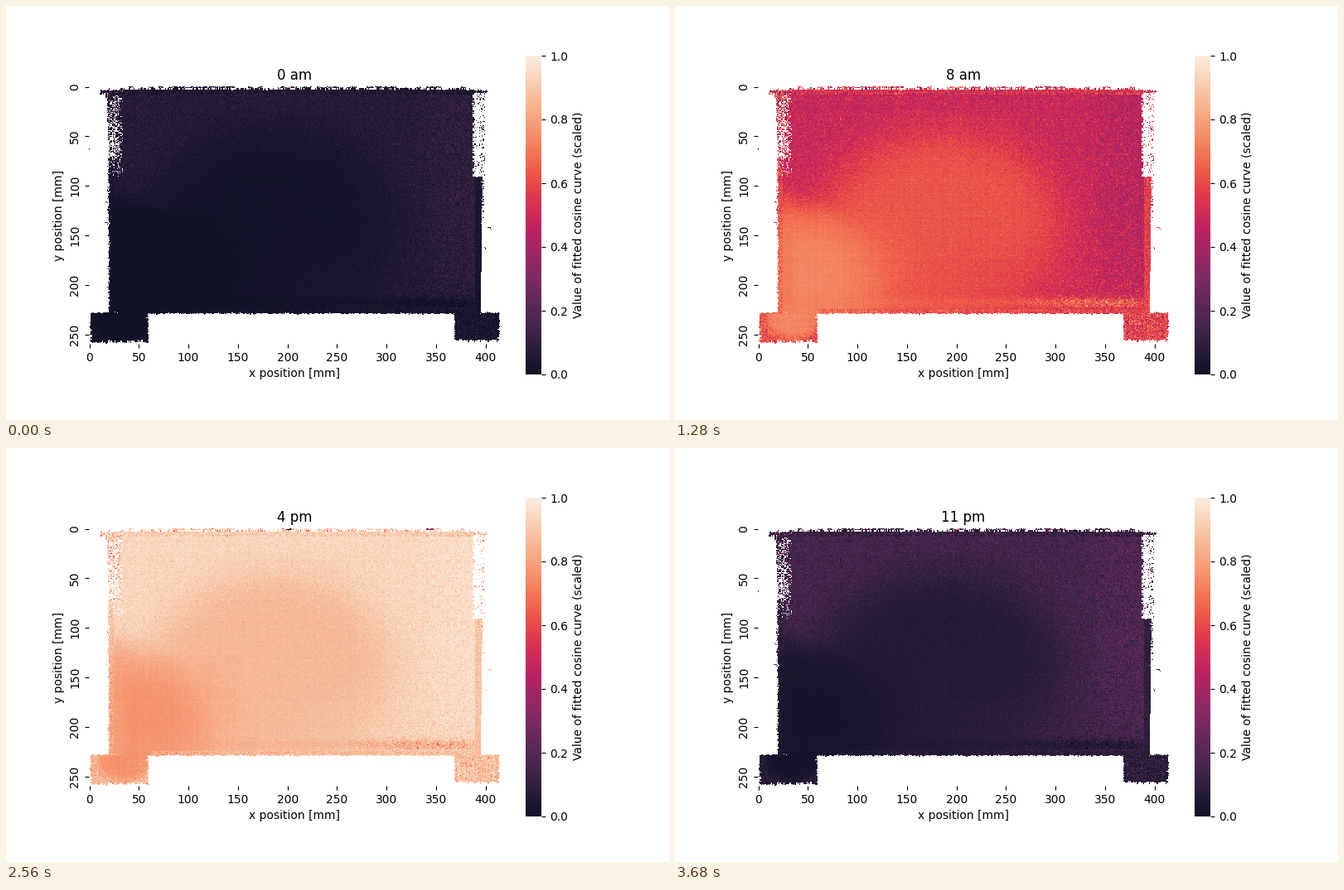
A matplotlib script for the animation above (3840 ms loop, 800 px wide and 500 px high).

```python
import numpy as np
import matplotlib.pyplot as plt
from matplotlib.animation import FuncAnimation
from matplotlib.colors import LinearSegmentedColormap, to_rgb

COLS, ROWS, HOURS = 415, 260, 24
rng = np.random.default_rng(7)
x, y = np.meshgrid(np.arange(COLS), np.arange(ROWS))

# two evenly spaced samplings of the same colour scale
SCALE_7 = "03051a 35193e 701f57 ad1759 e13342 f37651 f6b48f faebdd"
SCALE_11 = ("03051a 221331 451c47 691f55 921c5b b91657 "
            "d92847 ed503e f47d57 f6a47c f7c9aa faebdd")
ALPHA = 0.95


def on_white(color):
    return tuple(1 - ALPHA * (1 - c) for c in to_rgb("#" + color))


def make_cmap():
    stops = {}
    for scale in (SCALE_7.split(), SCALE_11.split()):
        for pos, color in zip(np.linspace(0, 1, len(scale)), scale):
            stops[float(pos)] = on_white(color)
    cmap = LinearSegmentedColormap.from_list("heat", sorted(stops.items()))
    cmap.set_bad("white")
    return cmap


def step(v):
    return 1 / (1 + np.exp(-np.clip(v, -40, 40)))


def blob(cx, cy, rx, ry, soft):
    """Soft-edged ellipse: 1 inside, 0 outside."""
    return step((1 - np.hypot((x - cx) / rx, (y - cy) / ry)) / soft)


def mix(a, b, w):
    return a * (1 - w) + b * w


def box(x0, x1, y0, y1, rough=0.6):
    """Rectangle with ragged edges."""
    jx = rng.normal(0, rough, (2, ROWS, 1))
    jy = rng.normal(0, rough, (2, 1, COLS))
    return ((x >= x0 + jx[0]) & (x < x1 + jx[1]) &
            (y >= y0 + jy[0]) & (y < y1 + jy[1]))


def sprinkle(area, density):
    return area & (rng.random((ROWS, COLS)) < density)


def make_mask():
    core = box(31, 387, 2, 229, 0.5)
    core |= box(19.5, 40, 73, 229) | box(380, 396, 91, 229)
    core &= ~((x > 394.5 - (y - 228) * 0.012) & (y > 120))
    core &= ~sprinkle((x < 34) & (y < 92), 0.15)
    feet = box(1.5, 59, 228, 257.5) | box(367.8, 413, 228, 256)
    ears = box(11, 20, 3.5, 7) | box(18, 33, 3, 9) | box(386, 402, 3.5, 6.5)

    slant = 16.5 + np.clip(y - 5, 0, 70) * 0.05
    fringe = (x >= slant) & (x < 32) & (y >= 5) & (y < 75)
    loose = sprinkle(fringe, 0.8 - 0.35 * y / 75)
    loose |= sprinkle((x >= 18) & (x < 22) & (y > 72) & (y < 140), 0.12)
    loose |= sprinkle((x >= 387) & (x < 399) & (y > 5) & (y < 92),
                      np.where(x > 392, 0.2, 0.09))
    loose |= sprinkle((x >= 395) & (x < 398) & (y > 90) & (y < 135), 0.3)

    # broken line of readings along the top edge
    runs = np.repeat(rng.random(COLS // 5) < 0.45, 5)
    runs[[*range(88, 147), *range(193, 205), *range(230, 256)]] = True
    top = (y < 2) & (x > 35) & (x < 380) & runs[None, :]
    loose |= sprinkle(top, np.where(y == 0, 0.5, 0.85))

    for px, py in [(0, 63), (402, 142), (403, 142), (404, 142), (404, 143),
                   (405, 144), (398, 162), (399, 163), (399, 164),
                   (17, 116), (16, 137), (17, 137)]:
        loose[py, px] = True
    return core | feet | ears | loose, core | feet


def make_peak(solid):
    """Hour of the daily maximum for every cell."""
    dome = np.maximum(blob(185, 145, 120, 100, 0.12),
                      blob(65, 190, 85, 74, 0.1))
    hot = blob(38, 194, 82, 60, 0.2)
    right = step((x - 345) / 14)
    low_right = step((x - 200) / 30) * step((y - 160) / 20)

    outer = 14.1 + 0.3 * right - 0.3 * step((y - 190) / 20)
    peak = mix(outer, 13.0 + 0.3 * low_right, dome)
    peak = mix(peak, 12.1, hot)
    peak = mix(peak, 12.5, 0.6 * np.exp(-((x - 29) / 7) ** 2)
               * step((y - 115) / 9))
    band = np.exp(-((y - 218) / 5.5) ** 2)
    streak = step((x - 285) / 14) * step((385 - x) / 5)
    peak = mix(peak, 12.4, band * (0.35 + 0.4 * streak))

    spread = (0.06 + 0.08 * (1 - hot) + 0.2 * (1 - dome) * (1 - hot)
              + 0.12 * right + 0.3 * band * streak)

    def region(where, value, sigma, weight=1.0):
        peak[where] = mix(peak[where], value, weight)
        spread[where] = sigma

    body = y < 229
    region(body & (y > 224) & (x > 60), 13.0, 0.4, 0.6)
    region(body & (x < 25) & (y > 73), 12.95, 0.35, 0.6)
    region(body & (x > 388) & (y > 90), 13.1, 0.4, 0.7)
    region(y < 8, 13.7, 0.55, 0.8)
    region((x < 33) & (y < 75), 14.0, 0.9)
    region((x > 387) & (y < 91), 14.0, 1.2)
    region(~body & (x > 360), 13.3, 0.7)
    region(~body & (x < 60), 13.1, 0.6)
    inner = blob(35, 236, 27, 18, 0.12) * ~body
    peak[:] = mix(peak, 12.15, inner)
    spread[:] = mix(spread, 0.12, inner)
    region(y < 3, 13.3, 1.2)
    region(~solid, 13.8, 1.3)

    peak += spread * rng.normal(size=peak.shape)
    peak += rng.normal(0, 0.03, (ROWS, 1)) + rng.normal(0, 0.03, (1, COLS))
    peak[:2, 199:204] = 4
    peak[:2, 338:347] = 9 + rng.normal(0, 0.8, (2, 9))
    peak[63, 0] = 16.5
    return peak


mask, solid = make_mask()
peak = make_peak(solid)


def values(hour):
    wave = 0.5 * (1 + np.cos(2 * np.pi * (hour - peak) / HOURS))
    return np.ma.array(wave, mask=~mask)


def title(hour):
    return f"{hour} am" if hour < 12 else f"{(hour - 1) % 12 + 1} pm"


fig, ax = plt.subplots(figsize=(8, 5), dpi=100)
image = ax.imshow(values(0), cmap=make_cmap(), vmin=0, vmax=1,
                  extent=(0, COLS, ROWS, 0), interpolation="nearest")
bar = fig.colorbar(image, ax=ax)
bar.outline.set_linewidth(0)
bar.set_label("Value of fitted cosine curve (scaled)")

ax.spines[:].set_visible(False)
xt, yt = np.arange(0, 401, 50), np.arange(0, 251, 50)
ax.set_xticks(xt + 0.5, xt)
ax.set_yticks(yt + 0.5, yt, rotation="vertical", va="center")
ax.set_xlabel("x position [mm]")
ax.set_ylabel("y position [mm]")
heading = ax.set_title(title(0))


def update(hour):
    image.set_data(values(hour))
    heading.set_text(title(hour))
    return image, heading


anim = FuncAnimation(fig, update, frames=HOURS, interval=160,
                     repeat=True, repeat_delay=0)
plt.show()
```
